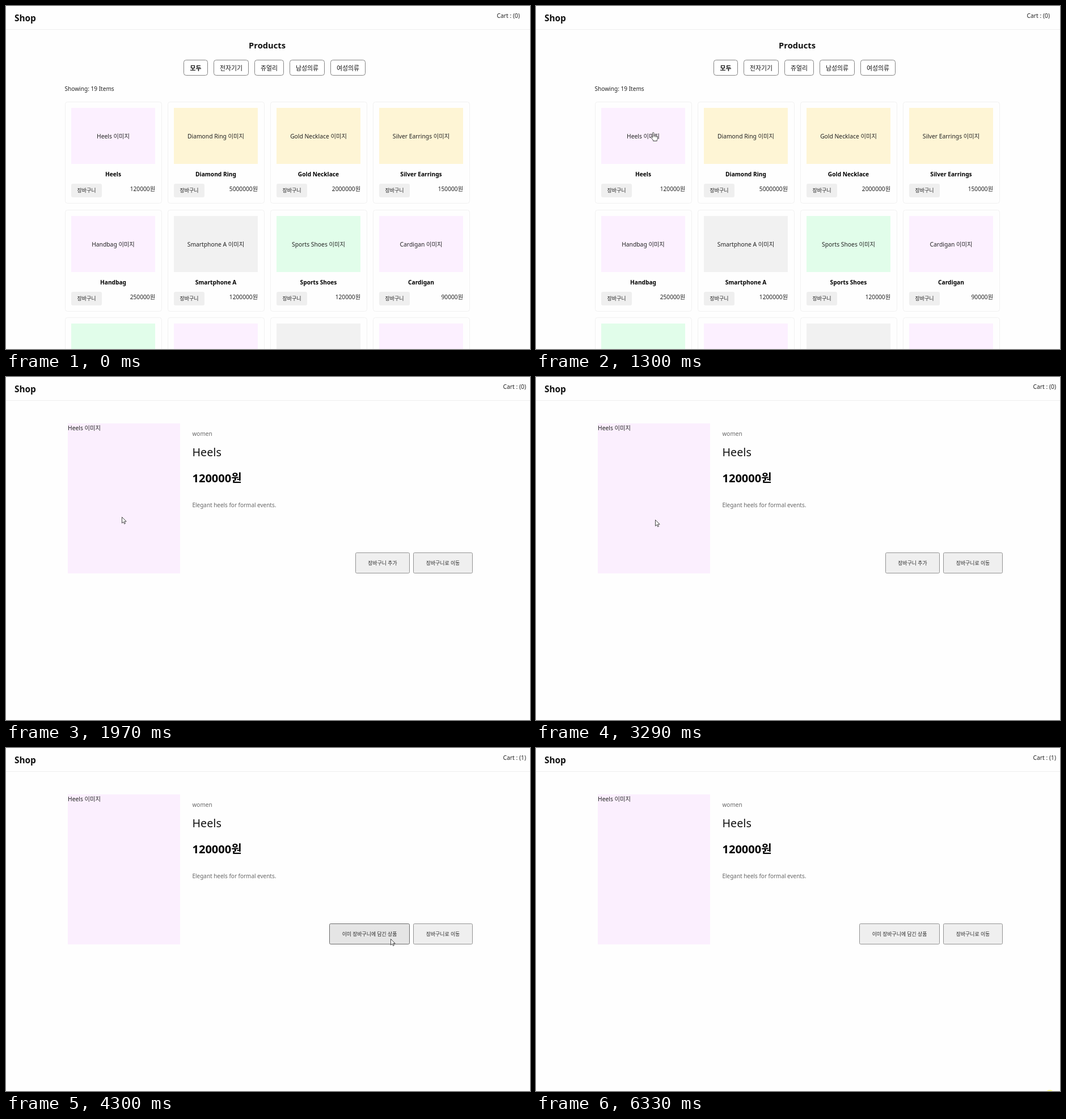
Recreate the animation shown at these times as an HTML page with a canvas. Size 924 by 606 pixels, loop 6.4 s.

```html
<!DOCTYPE html>
<html lang="ko">
<head>
<meta charset="utf-8">
<title>Shop</title>
<style>
html, body { margin: 0; width: 100%; height: 100%; overflow: hidden; background: #fefefe; }
canvas { display: block; }
</style>
</head>
<body>
<canvas id="stage" width="924" height="606"></canvas>
<script>
const ctx = document.getElementById('stage').getContext('2d');
const LOOP = 6400;
const FONT = '"Noto Sans", "Noto Sans CJK KR", "Noto Sans CJK", sans-serif';
const PINK = '#fcf0ff', GOLD = '#fef5d5', GREY = '#f1f1f1', MINT = '#e1fdea';

const PRODUCTS = [
  ['Heels', 120000, PINK], ['Diamond Ring', 5000000, GOLD],
  ['Gold Necklace', 2000000, GOLD], ['Silver Earrings', 150000, GOLD],
  ['Handbag', 250000, PINK], ['Smartphone A', 1200000, GREY],
  ['Sports Shoes', 120000, MINT], ['Cardigan', 90000, PINK],
  ['', 0, MINT], ['', 0, PINK], ['', 0, GREY], ['', 0, PINK]
];
const FILTERS = [
  ['모두', 313, 43], ['전자기기', 366, 62], ['쥬얼리', 438, 52],
  ['남성의류', 500, 62], ['여성의류', 572, 62]
];

const DETAIL_AT = 1970, ADDED_AT = 4300, ENTER = 460, LEAVE = 5870;

// The pointer is sampled in equal steps along a smooth curve through each list of points.
const MOVES = [
  { from: 460, to: 1100, steps: 10, pts: [[915, 550], [868, 440], [715, 290], [510, 205], [345, 179], [262, 192]] },
  { from: 1170, to: 1570, steps: 7, pts: [[248, 201], [207, 223], [204, 236], [204, 247]] },
  { from: 3290, to: 3920, steps: 10, pts: [[210, 252], [262, 318], [400, 388], [560, 398], [690, 362], [738, 338], [714, 333]] },
  { from: 3980, to: 4180, steps: 4, pts: [[707, 327], [692, 331], [682, 335], [678, 337]] },
  { from: 5180, to: 5800, steps: 10, pts: [[676, 341], [735, 415], [835, 523], [892, 580], [905, 591]] }
];

function curve(pts, u) {
  const last = pts.length - 1;
  const i = Math.min(Math.floor(u * last), last - 1);
  const f = u * last - i;
  const at = k => pts[Math.max(0, Math.min(last, k))];
  return [0, 1].map(d => {
    const a = at(i - 1)[d], b = at(i)[d], c = at(i + 1)[d], e = at(i + 2)[d];
    return b + 0.5 * f * (c - a + f * (2 * a - 5 * b + 4 * c - e + f * (3 * (b - c) + e - a)));
  });
}

function pointerAt(t) {
  const m = MOVES.filter(move => move.from <= t).pop();
  if (!m) return [-50, -50];
  const n = m.steps - 1;
  // Steps fall on whole hundredths of a second, so allow a little slack.
  const step = Math.min(n, Math.floor((t - m.from) / (m.to - m.from) * n + 0.1));
  return curve(m.pts, step / n).map(Math.round);
}

const inside = ([px, py], [x, y, w, h]) => px >= x && px < x + w && py >= y && py < y + h;

function text(str, x, y, size, { weight = 400, color = '#222', align = 'left' } = {}) {
  ctx.font = `${weight} ${size}px ${FONT}`;
  ctx.fillStyle = color;
  ctx.textAlign = align;
  ctx.fillText(str, x, y);
}

function rect(x, y, w, h, color) {
  ctx.fillStyle = color;
  ctx.fillRect(x, y, w, h);
}

function box(x, y, w, h, r, fill, stroke) {
  const o = stroke ? 0.5 : 0;
  ctx.beginPath();
  ctx.roundRect(x + o, y + o, w - 2 * o, h - 2 * o, r);
  if (fill) { ctx.fillStyle = fill; ctx.fill(); }
  if (stroke) { ctx.strokeStyle = stroke; ctx.lineWidth = 1; ctx.stroke(); }
}

function header(count, right) {
  rect(0, 0, 924, 606, '#fefefe');
  rect(0, 41, 924, 1, '#efefef');
  text('Shop', 15, 27, 15.4, { weight: 700, color: '#111' });
  text(`Cart : (${count})`, right, 21, 10.3, { align: 'right' });
}

const cardBox = i => [104 + 181 * (i % 4), 169 + Math.round(190.6 * Math.floor(i / 4)), 171, 180];

function card([name, price, color], i) {
  const [x, y, w, h] = cardBox(i);
  const mid = x + 85;
  box(x, y, w, h, 4, '#fefefe', '#f1f1f1');
  rect(x + 11, y + 11, 148, 99, color);
  if (!name) return;
  text(name + ' 이미지', mid, y + 65, 10.3, { align: 'center' });
  text(name, mid, y + 132, 10.2, { weight: 700, color: '#000', align: 'center' });
  box(x + 11, y + 145, 54, 24, 3, '#efefef');
  text('장바구니', x + 38, y + 160, 9, { align: 'center' });
  text(price + '원', x + 159, y + 158, 10.2, { align: 'right' });
}

function listPage() {
  header(0, 906);
  text('Products', 460.5, 75, 14.7, { weight: 700, color: '#111', align: 'center' });
  FILTERS.forEach(([label, x, w], i) => {
    box(x, 95, w, 28, 4, '#fff', '#858585');
    text(label, x + w / 2, 114, 10.9, { weight: i ? 400 : 700, color: '#111', align: 'center' });
  });
  text('Showing: 19 Items', 103.5, 150, 10.1);
  PRODUCTS.forEach(card);
}

function button(label, area, t) {
  const [x, y, w, h] = area;
  // The hover tint follows the pointer by one step.
  const hover = inside(pointerAt(t), area) && inside(pointerAt(t - 60), area);
  box(x, y, w, h, 2, hover ? '#e5e5e5' : '#efefef', hover ? '#6c6c6c' : '#929292');
  text(label, x + w / 2, y + 22, 8.9, { color: '#2a2a2a', align: 'center' });
}

function detailPage(t) {
  const added = t >= ADDED_AT;
  header(added ? 1 : 0, 917);
  rect(109, 82, 198, 265, '#fbeffe');
  text('Heels 이미지', 109, 94, 10.3);
  text('women', 328.5, 104, 10, { color: '#666' });
  text('Heels', 328.5, 140, 19.7, { color: '#111' });
  text('120000원', 328.5, 186, 20, { weight: 600, color: '#000' });
  text('Elegant heels for formal events.', 328.5, 230, 9.95, { color: '#666' });
  button(added ? '이미 장바구니에 담긴 상품' : '장바구니 추가',
    added ? [570, 310, 142, 37] : [616, 310, 96, 37], t);
  button('장바구니로 이동', [718, 310, 105, 37], t);
}

const ARROW = new Path2D('M.5 .5V11.2L3 8.9L4.7 12.6L6.4 11.8L4.7 8.2H8.2Z');
const HAND = new Path2D('M-1.5 9.5V1.6Q-1.5 .4 -.3 .4Q.9 .4 .9 1.6V6' +
  'Q1.2 4.8 2.2 5Q3.2 5.2 3.2 6.3Q3.6 5.5 4.6 5.7Q5.4 5.9 5.4 7' +
  'Q5.8 6.3 6.6 6.5Q7.5 6.8 7.5 8V11Q7.5 12.4 6.3 13.6V15.5H-.4V14' +
  'L-4.2 9.4Q-4.9 8.4 -4 7.8Q-3.2 7.4 -2.4 8.4Z');
const HAND_FOLDS = new Path2D('M.9 6V8.4M3.2 6.3V8.6M5.4 7V9');

function pointer(t) {
  const pos = pointerAt(t);
  const hand = t < 1840 && PRODUCTS.some((p, i) => inside(pos, cardBox(i)));
  ctx.save();
  ctx.translate(...pos);
  ctx.lineWidth = 0.9;
  ctx.lineJoin = 'round';
  ctx.fillStyle = '#fff';
  ctx.strokeStyle = '#333';
  const shape = hand ? HAND : ARROW;
  ctx.fill(shape);
  ctx.stroke(shape);
  if (hand) ctx.stroke(HAND_FOLDS);
  ctx.restore();
}

function glow() {
  ctx.fillStyle = '#ffff8c';
  ctx.beginPath();
  ctx.ellipse(906, 607, 5.5, 3, 0, 0, 7);
  ctx.fill();
}

function draw(t) {
  if (t < DETAIL_AT) listPage();
  else detailPage(t);
  if (t >= ENTER && t < LEAVE) pointer(t);
  if (t >= 6330) glow();
}

const start = performance.now();
function tick() {
  draw((performance.now() - start) % LOOP);
  requestAnimationFrame(tick);
}
tick();
</script>
</body>
</html>
```
